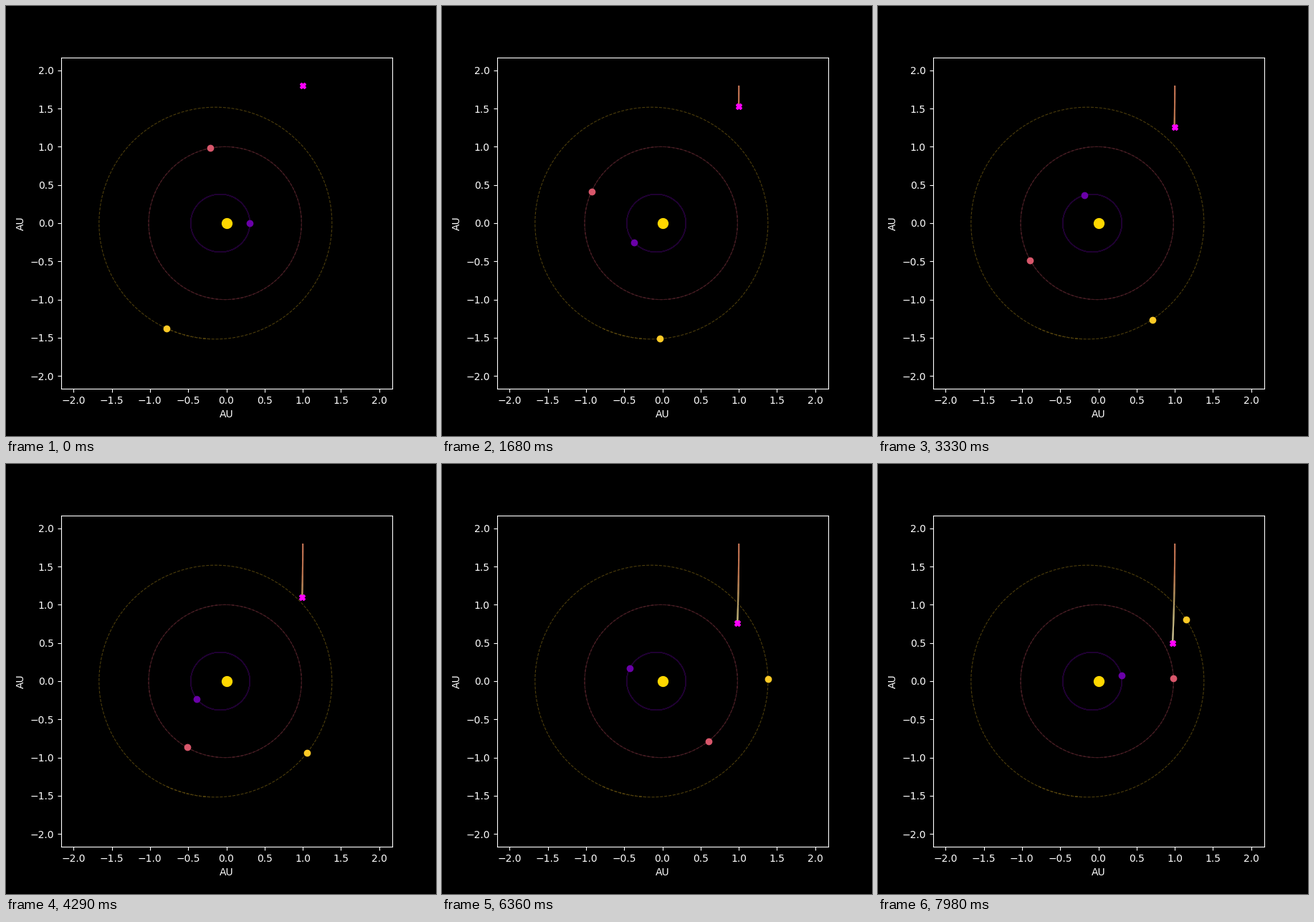
Write a matplotlib script that moves like this. It is 600x600 px and loops after 8000 ms.

```python
import numpy as np
import matplotlib.pyplot as plt
from matplotlib.animation import FuncAnimation
from matplotlib.collections import LineCollection

plt.style.use("dark_background")

LOOP_MS = 8000
TICK_MS = 20
DAY_MS = 30
DAYS = 267
ORBIT_DAYS = 731
LIMIT = 1.666 * 1.3

# semi-major axis (AU), eccentricity, period (days), start anomaly (deg), colour
PLANETS = [
    (0.3871, 0.2056, 87.97, 0, "#6a00a8"),
    (1.0000, 0.0167, 365.25, 100, "#d8576b"),
    (1.5237, 0.0934, 686.98, 250, "#fdca26"),
]


def kepler_path(a, e, period, start, days):
    """Positions on an ellipse with the sun in one focus, one per day."""
    mean = np.radians(start) + 2 * np.pi * np.arange(days) / period
    ecc = mean.copy()
    for _ in range(8):
        ecc -= (ecc - e * np.sin(ecc) - mean) / (1 - e * np.cos(ecc))
    return a * (np.cos(ecc) - e), a * np.sqrt(1 - e * e) * np.sin(ecc)


def probe_path(days):
    d = np.arange(days)
    return 1 - 0.029 * (d / 266) ** 2, 1.8 - 0.0049 * d


def trail_colors(y):
    """Copper at the launch point, fading to pale sand."""
    stops = [0.5, 0.85, 1.1, 1.4, 1.8]
    channels = ([205, 190, 178, 190, 190],
                [195, 175, 148, 118, 112],
                [152, 118, 95, 80, 82])
    return np.column_stack([np.interp(y, stops, c) for c in channels]) / 255


fig, ax = plt.subplots(figsize=(6, 6), dpi=100)
ax.set_aspect("equal")
ax.set_xlim(-LIMIT, LIMIT)
ax.set_ylim(-LIMIT, LIMIT)
ax.set_xlabel("AU")
ax.set_ylabel("AU")

ax.plot(0, 0, "o", color="gold", markersize=10)

movers = []
for a, e, period, start, color in PLANETS:
    x, y = kepler_path(a, e, period, start, ORBIT_DAYS)
    ax.plot(x, y, "--", color=color, lw=0.8, alpha=0.3)
    dot, = ax.plot([], [], "o", color=color, markersize=6)
    movers.append((dot, x, y))

px, py = probe_path(DAYS + 2)
points = np.column_stack([px, py])
# neighbouring pieces overlap so the trail shows no seams
pieces = np.stack([points[:-2], points[1:-1], points[2:]], axis=1)
colors = trail_colors(py[:-2])
trail = LineCollection([], linewidths=1.5, zorder=2)
ax.add_collection(trail, autolim=False)
probe, = ax.plot([], [], "X", color="magenta", markersize=6, zorder=3)
movers.append((probe, px, py))


def update(frame):
    day = min((frame * TICK_MS + TICK_MS // 2) // DAY_MS, DAYS - 1)
    for mark, x, y in movers:
        mark.set_data([x[day]], [y[day]])
    trail.set_segments(pieces[:day])
    trail.set_color(colors[:day])
    return [mark for mark, _, _ in movers] + [trail]


anim = FuncAnimation(fig, update, frames=LOOP_MS // TICK_MS, interval=TICK_MS,
                     init_func=lambda: update(0), repeat=True, repeat_delay=0)
plt.show()
```
